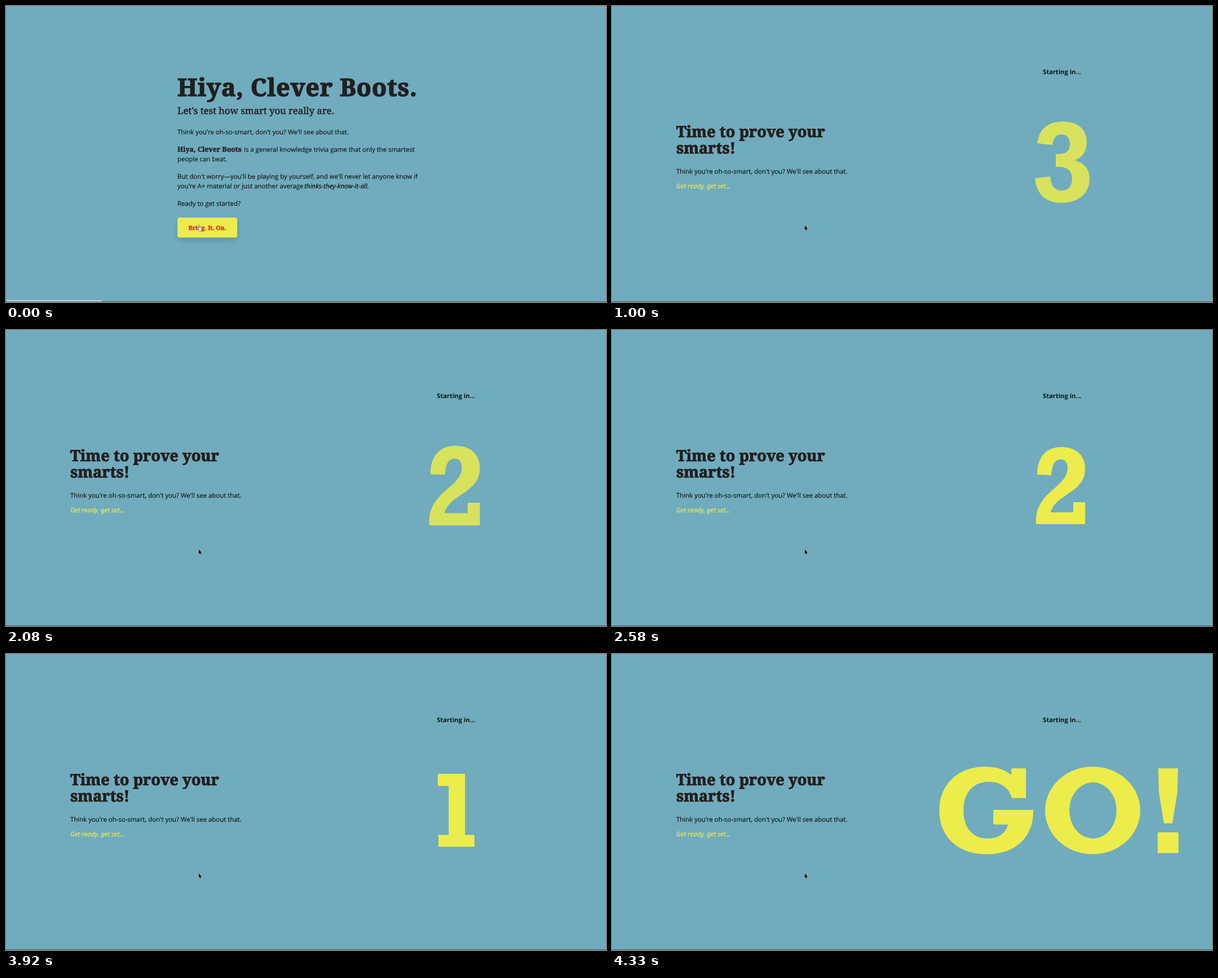
An HTML page with a canvas that plays this animation: 1064x526 px, repeating every 4.41 s.

```html
<!DOCTYPE html>
<html lang="en">
<head>
<meta charset="utf-8">
<title>Trivia countdown</title>
<style>
  html, body { margin: 0; width: 100%; height: 100%; overflow: hidden; background: #70acbe; }
  canvas { display: block; }
</style>
</head>
<body>
<canvas id="stage" width="1064" height="526"></canvas>
<script>
const ctx = document.getElementById('stage').getContext('2d');
const LOOP = 4410, STEP = 1000 / 12, COUNT_START = 1000;
const CX = 798, CY = 278;
const BG = '#70acbe', INK = '#231f20', BODY = '#121417', YELLOW = '#ecec4c', RED = '#e5302a';
const SANS = '"Open Sans", "Noto Sans", sans-serif';
const SLANTED = '"Noto Sans", "Open Sans", sans-serif';
const SLAB = '"Noto Serif", "Liberation Serif", serif';

// Each glyph is drawn in stage coordinates at its own size factor.
const glyphs = [
  { at: 832, size: 1.074, path: new Path2D(
    'M754 244C757 219 773 205 799 205C826 205 842 219 842 241C842 258 835 269 820 274' +
    'C838 279 847 290 847 307C847 333 827 350 798 350C770 350 752 335 750 306L777 303' +
    'C778 319 785 328 797 328C809 328 816 320 816 307C816 293 807 286 794 286H787V263H794' +
    'C806 263 812 256 812 245C812 235 807 228 797 228C788 228 782 235 781 247Z') },
  { at: 1916, size: 1.035, path: new Path2D(
    'M754 257C754 227 769 208 797 208C823 208 839 223 839 246C839 270 825 280 806 293' +
    'C792 302 781 311 778 324H818V306H839V345H752V338C752 312 767 296 786 280' +
    'C801 267 808 258 808 245C808 235 803 230 796 230C785 230 780 240 779 258Z') },
  { at: 2871, size: 1, path: new Path2D(
    'M765.7 213H814V321.6H830.7V342.5H766.8V321.6H785V234.5H765.7Z') },
  { at: 3925, size: 1.163, path: new Path2D(
    'M708 203H734V256H709C704 238 689 227 668 227C640 227 623 247 623 278' +
    'C623 309 639 328 666 328C685 328 698 319 702 303H676V277H747C748 324 717 356 664 356' +
    'C613 356 580 325 580 278C580 231 614 200 661 200C681 200 697 205 708 215Z' +
    'M768 278A84.5 78 0 1 1 937 278A84.5 78 0 1 1 768 278Z' +
    'M811 278A42 50 0 1 0 895 278A42 50 0 1 0 811 278Z' +
    'M969 203H1004L1003 245L994 301H979L970 245ZM968 317H1005V354H968Z') }
];

const arrow = new Path2D('M341.8 389.6V398.2L343.7 396.5L345 399.2L346.2 398.6L345 396.1H347.2Z');
const hand = new Path2D(
  'M341.6 389.6Q342.6 388.7 343.2 390V393L346.4 393.7Q347.4 394.2 347.2 395.6L346.3 399.8H342.6' +
  'L340.3 396.3Q340 395 341.6 395.6Z');

// CSS "ease": cubic-bezier(.25, .1, .25, 1)
function ease(x) {
  let lo = 0, hi = 1, u = 0.5;
  for (let i = 0; i < 24; i++) {
    u = (lo + hi) / 2;
    const bx = 0.75 * u * (1 - u) + u * u * u;
    if (bx < x) lo = u; else hi = u;
  }
  const v = 1 - u;
  return 0.3 * v * v * u + 3 * v * u * u + u * u * u;
}

// Pop in over 300 ms, then settle over 700 ms.
function pop(ms) {
  if (ms < 300) {
    const p = ease(ms / 300);
    return { scale: 0.3 + 0.9 * p, alpha: p };
  }
  return { scale: 1.2 - 0.2 * ease(Math.min(1, (ms - 300) / 700)), alpha: 1 };
}

function text(str, x, y, font, color, { align = 'left', bold = 0, spacing = 0 } = {}) {
  ctx.font = font;
  ctx.letterSpacing = spacing + 'px';
  ctx.textAlign = align;
  ctx.fillStyle = ctx.strokeStyle = color;
  ctx.fillText(str, x, y);
  if (bold) {
    ctx.lineWidth = bold;
    ctx.lineJoin = 'miter';
    ctx.miterLimit = 2;
    ctx.strokeText(str, x, y);
  }
}

const body = (str, x, y) => text(str, x, y, `11.42px ${SANS}`, BODY, { bold: 0.15 });
const italic = (str, x, y, color) =>
  text(str, x, y, `italic 11.42px ${SLANTED}`, color, { bold: 0.2 });
const slab = (str, x, y, px, options, color = INK) =>
  text(str, x, y, `bold ${px}px ${SLAB}`, color, options);

function cursor(path, fill, line) {
  ctx.lineJoin = 'round';
  ctx.lineWidth = 1;
  ctx.strokeStyle = line;
  ctx.stroke(path);
  ctx.fillStyle = fill;
  ctx.fill(path);
}

function button() {
  ctx.save();
  ctx.shadowColor = 'rgba(0, 0, 0, .14)';
  ctx.shadowBlur = 10;
  ctx.shadowOffsetY = 5;
  ctx.fillStyle = YELLOW;
  ctx.beginPath();
  ctx.roundRect(304, 376, 106, 35.5, 4);
  ctx.fill();
  ctx.restore();
  slab('Bring. It. On.', 357, 397.5, 10.4, { bold: 0.5, align: 'center' }, RED);
}

function intro() {
  slab('Hiya, Clever Boots.', 304, 159.5, 43, { bold: 1.4, spacing: 0.8 });
  text("Let's test how smart you really are.", 304, 191.5, `16.7px ${SLAB}`, INK, { bold: 0.5 });
  body("Think you're oh-so-smart, don't you? We'll see about that.", 304, 228);
  slab('Hiya, Clever Boots', 304, 259, 12.3, { bold: 0.4 });
  body('is a general knowledge trivia game that only the smartest', 422, 259);
  body('people can beat.', 304, 276);
  body("But don't worry\u2014you'll be playing by yourself, and we'll never let anyone know if", 304, 307);
  body("you're A+ material or just another average", 304, 324);
  italic('thinks-they-know-it-all.', 529, 324, BODY);
  body('Ready to get started?', 304, 354.5);
  button();
  cursor(hand, '#f4f6f6', '#15232c');
  ctx.fillStyle = '#d0dde2';
  ctx.fillRect(1, 523, 169, 2);
}

function countdown(t) {
  slab('Time to prove your', 114, 233, 27.2, { bold: 1 });
  slab('smarts!', 114, 261.5, 27.2, { bold: 1 });
  body("Think you're oh-so-smart, don't you? We'll see about that.", 114, 297.5);
  italic('Get ready, get set...', 114, 323.5, YELLOW);
  text('Starting in...', CX, 120.5, `bold 11.2px ${SANS}`, BODY, { align: 'center' });

  const glyph = glyphs.filter(g => t >= g.at).pop();
  const { scale, alpha } = pop(t - glyph.at);
  const k = scale / glyph.size;
  ctx.save();
  ctx.globalAlpha = alpha;
  ctx.translate(CX, CY);
  ctx.scale(k, k);
  ctx.translate(-CX, -CY);
  ctx.fillStyle = YELLOW;
  ctx.fill(glyph.path);
  ctx.restore();

  cursor(arrow, '#0b0b0d', '#c9dde3');
}

function draw(now) {
  // The picture advances at 12 steps per second.
  const t = Math.floor((now % LOOP + 4) / STEP) * STEP;
  ctx.textRendering = 'geometricPrecision';
  ctx.fillStyle = BG;
  ctx.fillRect(0, 0, 1064, 526);
  if (t < COUNT_START - 1) intro();
  else countdown(t);
  ctx.fillStyle = '#3f5a63';
  ctx.fillRect(0, 525, 1064, 1);
}

const start = performance.now();
function tick() {
  draw(performance.now() - start);
  requestAnimationFrame(tick);
}
tick();
</script>
</body>
</html>
```
